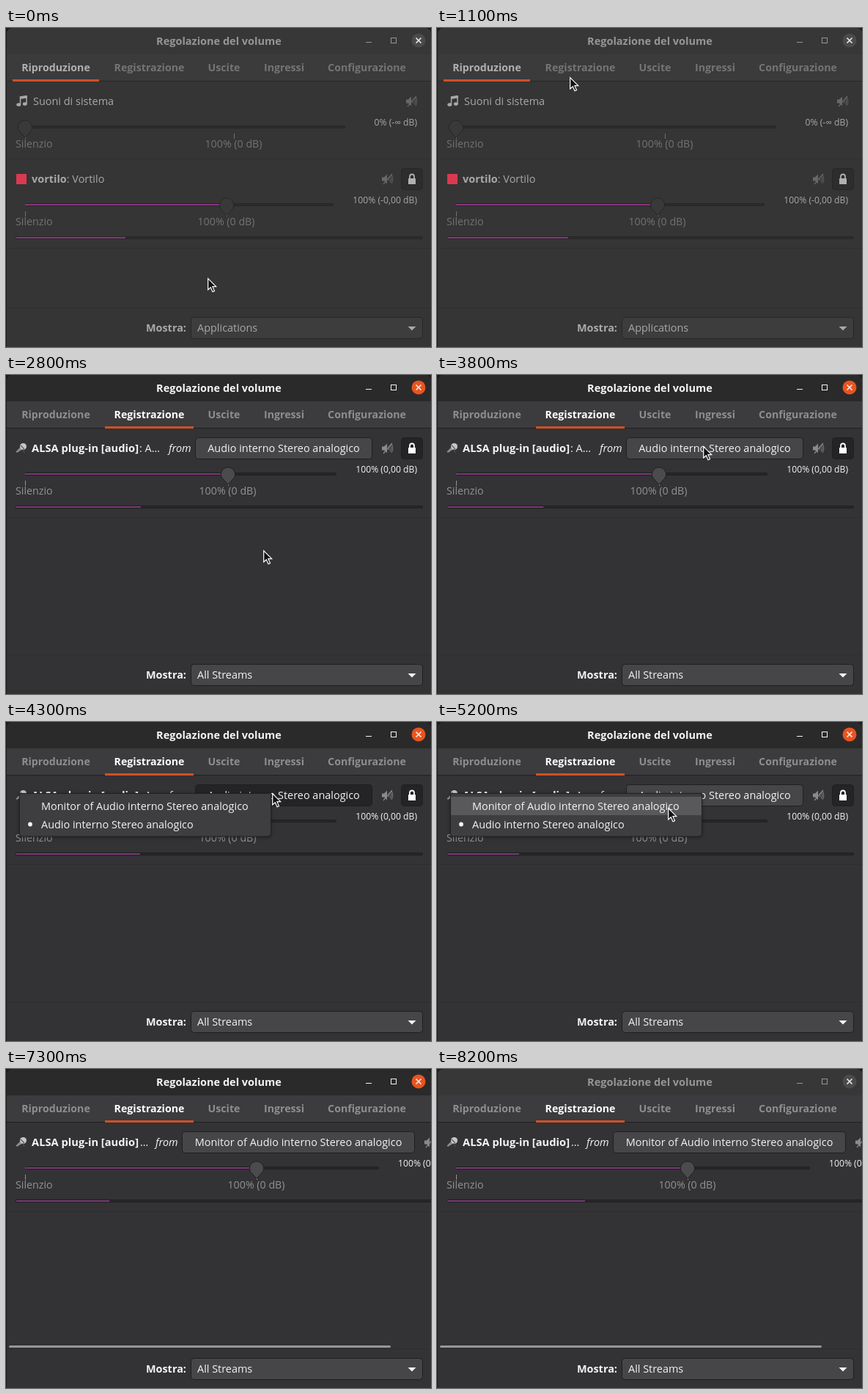
Animation of 580x435 px, one loop 8.3 s. Source, as an HTML page:

```html
<!DOCTYPE html>
<html lang="it">
<head>
<meta charset="utf-8">
<title>Regolazione del volume</title>
<style>
  html, body { margin: 0; width: 100%; height: 100%; overflow: hidden; background: #333234; }
  svg {
    display: block; font: 14.45px "Open Sans", "Noto Sans", sans-serif;
    --title: #2b2a2b; --titleText: #f5f5f5; --close: #e95420; --bg: #333234; --bar: #3c3b3d;
    --tab: #8e8d8f; --on: #fff; --text: #f4f4f4; --label: #929193;
    --knob: #4b4a4c; --button: #464547; --down: #242325; --fill: #7a3a78; --icon: #8a898b;
    --trough: #272628; --edge: #1f1e20; --line: #2e2d2f;
  }
  svg.blur { --title: #383738; --titleText: #969596; --close: #4b4a4c; }
  svg.away {
    --bg: #353535; --bar: #3b3b3b; --tab: #747474; --on: #b0b0b0; --text: #a8a8a8;
    --label: #727272; --knob: #393939; --button: #3d3d3d; --down: #2d2d2d; --fill: #8a3380;
    --icon: #686868; --trough: #2b2b2b; --edge: #262626; --line: #2f2f2f;
  }
  text { fill: var(--text); white-space: pre; }
  .b { font-weight: 700; }
  .i { font-style: italic; }
  .tab { font-weight: 700; font-size: 14.2px; text-anchor: middle; fill: var(--tab); }
  .tab.on { fill: var(--on); }
  .label { fill: var(--label); font-size: 14.25px; }
  .small { font-size: 12.2px; }
  .mid { text-anchor: middle; }
  .end { text-anchor: end; }
  .box { fill: var(--button); stroke: var(--edge); }
  .box.down { fill: var(--down); }
</style>
</head>
<body>
<svg id="stage" width="580" height="435" viewBox="0 0 580 435"></svg>
<script>
const stage = document.getElementById('stage');

const rect = (x, y, w, h, fill, extra = '') =>
  `<rect x="${x}" y="${y}" width="${w}" height="${h}" fill="${fill}" ${extra}/>`;
const text = (x, y, s, cls = '') => `<text x="${x}" y="${y}" class="${cls}">${s}</text>`;
const box = (x, y, w, h, cls = '') =>
  `<rect x="${x + .5}" y="${y + .5}" width="${w - 1}" height="${h - 1}" rx="4" class="box ${cls}"/>`;
const at = (x, y, s) => `<g transform="translate(${x} ${y})">${s}</g>`;
const group = (id, s) => `<g id="${id}">${s}</g>`;
const line = y => rect(1, y, 579, 1, 'var(--line)');

const trough = (x, y, w) =>
  `<rect x="${x + .5}" y="${y + .5}" width="${w - 1}" height="3" rx="1.5" fill="var(--trough)" stroke="var(--edge)"/>`;

function slider(y, end, knob, mark, low) {
  const tick = x => rect(x, y + 9, 1, 7, 'var(--label)');
  return trough(26, y - 2, end - 26) + tick(26) + tick(mark) +
    (low ? '' : rect(26, y - 1, knob - 26, 2, 'var(--fill)')) +
    at(knob, y, `<path d="M0 14.500L-8.500 5A9.600 9.600 0 1 1 8.500 5Z" fill="var(--knob)" stroke="var(--edge)"/>`) +
    text(13, y + 28, 'Silenzio', 'label') +
    text(mark - .5, y + 28, '100% (0 dB)', 'label mid');
}

const meter = (id, y, w) =>
  trough(13, y - 2, w) + `<rect id="${id}" x="14" y="${y - 1}" height="2" fill="var(--fill)"/>`;

const speaker = (x, y) => at(x, y,
  `<path d="M-8-2.500h3l4-4v13l-4-4h-3Z" fill="var(--icon)"/>
   <path d="M1-2.500q2 2.500 0 5M3-4.500q3.500 4.500 0 9M5-6q3.500 6 0 12" fill="none" stroke="var(--icon)" stroke-width="1.200" opacity=".75"/>
   <path d="M-6 7L6-7" stroke="var(--icon)" stroke-width="1.200"/>`);

const lock = (x, y) => box(x, y, 30, 30, 'down') + at(x + 15, y + 15,
  `<rect x="-5" y="-1" width="10" height="8" rx=".5" fill="var(--on)"/>
   <path d="M-3-1v-2.500a3 3 0 0 1 6 0V-1" fill="none" stroke="var(--on)" stroke-width="1.800"/>`);

const note = at(14, 92,
  `<path d="M5.500 12V2L14 .8V11" fill="none" stroke="var(--text)" stroke-width="1.500"/>
   <path d="M5 1.500L14.700 0v3.500L5 5Z" fill="var(--text)"/>
   <ellipse cx="3.300" cy="12.500" rx="3" ry="2.300" fill="var(--text)"/>
   <ellipse cx="11.800" cy="11.500" rx="3" ry="2.300" fill="var(--text)"/>`);

const mic = at(13, 92,
  `<path d="M7 6L.5 12.500l1.500 1.500L10 9Z" fill="#8d8c8e"/>
   <circle cx="10.500" cy="5.500" r="4.500" fill="#c6c5c7"/>
   <path d="M7 4l5 5" stroke="#59585a" stroke-width="1.300"/>
   <path d="M10 9l2 5" stroke="#59585a"/>`);

const windowButtons =
  rect(491, 19, 8, 1, 'var(--titleText)') +
  rect(525.5, 13.5, 7, 7, 'none', 'stroke="var(--titleText)"') +
  `<circle cx="563" cy="17" r="9.500" fill="var(--close)"/>
   <path d="M559.500 13.500l7 7m0-7l-7 7" stroke="#f4f4f4" stroke-width="1.500"/>`;

const tabs = [['Riproduzione', 68], ['Registrazione', 195.5], ['Uscite', 297.5], ['Ingressi', 379.5], ['Configurazione', 492.5]]
  .map(([s, x]) => text(x, 59, s, 'tab')).join('');

const playback =
  note + text(37, 105, 'Suoni di sistema') + speaker(554, 100) +
  text(561, 133, '0% (-∞ dB)', 'small end') + slider(135, 463, 26, 311, true) + line(178) +
  rect(14, 199, 14, 14, '#d93a50') +
  text(35, 211, '<tspan class="b">vortilo</tspan>: Vortilo') +
  speaker(521, 206) + lock(539, 191) + text(561, 239, '100% (-0,00 dB)', 'small end') +
  slider(241, 447, 301, 301) + meter('outLevel', 286, 556) + line(300);

const recordHead = mic + '<text x="35" y="105" class="b" style="font-size:14.7px">ALSA plug-in [audio]</text>';

const narrow =
  text(182, 105, ': A…') + text(222, 105, 'from', 'i') +
  '<g id="source">' + box(258, 85, 242, 30) + '</g>' +
  text(379, 105, 'Audio interno Stereo analogico', 'mid') + speaker(521, 100) + lock(539, 85) +
  text(561, 133, '100% (0,00 dB)', 'small end') + slider(135, 451, 303, 303);

const wide =
  text(183, 105, '…') + text(204, 105, 'from', 'i') + box(240, 85, 318, 30) +
  text(399, 105, 'Monitor of Audio interno Stereo analogico', 'mid') + speaker(579, 100) +
  text(535, 133, '100% (0,00 dB)', 'small') + slider(135, 509, 342, 342);

const popup =
  `<path d="M18.500 97.500h343V152q0 4-4 4H22.500q-4 0-4-4Z" fill="#3e3d3f" stroke="#222123"
    style="filter:drop-shadow(0 1px 2px #0006)"/>` +
  rect(19, 102, 342, 25, '#59585a', 'id="hover"') +
  text(48, 120, 'Monitor of Audio interno Stereo analogico') +
  text(48, 145, 'Audio interno Stereo analogico') +
  '<circle cx="33" cy="139.500" r="2.900" fill="#f4f4f4"/>';

stage.innerHTML =
  rect(0, 0, 580, 435, 'var(--bg)') +
  rect(0, 0, 580, 36, '#19181a') +
  '<path d="M1 36V8Q1 0 9 0H572Q580 0 580 8V36Z" fill="var(--title)"/>' +
  text(290.5, 23, '<tspan style="font-size:14.5px;fill:var(--titleText)">Regolazione del volume</tspan>', 'b mid') +
  windowButtons +
  rect(0, 36, 580, 37, 'var(--bar)') + rect(0, 72, 580, 1, 'var(--edge)') + tabs +
  rect(9, 70, 118, 3, '#cf5026', 'id="underline"') +
  group('playback', playback) +
  group('record', recordHead + group('narrow', narrow) + group('wide', wide) +
    meter('inLevel', 180, 556) + line(194)) +
  rect(4, 377, 521, 3, '#969597', 'id="scroll" rx="1.5"') +
  line(381) + text(246, 414, 'Mostra:', 'b end') + box(252, 394, 317, 30) +
  '<text id="filter" x="261" y="414"></text><path d="M548.500 407h11l-5.500 5.500Z" fill="var(--text)"/>' +
  rect(0, 0, 1, 435, '#1c1b1d') +
  group('popup', popup) +
  '<path id="cursor" d="M.7.7V16L4.300 12.700 7 18.700 9.500 17.600 6.900 11.700H11.700Z" fill="#111" stroke="#fff" stroke-width="1.200"/>';

const el = {};
stage.querySelectorAll('[id]').forEach(n => el[n.id] = n);
const tabText = stage.querySelectorAll('.tab');
const show = (n, on) => n.style.display = on ? '' : 'none';

const LOOP = 8300, STEP = 100;
const OPEN_TAB = 1200, PRESS = 3900, RELEASE = 4400, HOVER = 4800, CHOOSE = 5900, FADE = 6400, LEAVE = 7300, BLUR = 8200;

// time, x, y
const path = [
  [0, 275, 341], [200, 275, 341], [900, 186, 70], [1100, 181, 67], [1900, 181, 67],
  [2400, 338, 251], [2700, 351, 239], [2900, 351, 239], [3300, 469, 96], [3600, 363, 97],
  [4500, 363, 97], [5000, 315, 117], [6100, 315, 117], [6400, 314, 117], [6600, 314, 117], [7200, 200, 20]
];
// time, right end of the level bar
const outKeys = [[0, 163], [400, 144], [800, 205], [1200, 170]];
const inKeys = [
  [1200, 105], [1500, 145], [1800, 172], [2100, 81], [2400, 150], [2600, 96], [2800, 184],
  [3100, 85], [3400, 160], [3700, 118], [4000, 200], [4300, 183], [4700, 150], [5200, 112],
  [5600, 92], [6000, 210], [6400, 191], [6800, 100], [7200, 170], [7500, 84], [7900, 215], [8200, 202]
];

function sample(keys, t, ease = k => k) {
  let i = 0;
  while (i < keys.length - 2 && t >= keys[i + 1][0]) i++;
  const a = keys[i], b = keys[i + 1];
  const k = ease(Math.min(1, Math.max(0, (t - a[0]) / (b[0] - a[0]))));
  return a.slice(1).map((v, j) => v + (b[j + 1] - v) * k);
}
const smooth = k => k * k * (3 - 2 * k);

function draw(t) {
  const rec = t >= OPEN_TAB, chosen = t >= CHOOSE;
  stage.setAttribute('class', !rec ? 'away blur' : t >= BLUR ? 'blur' : '');
  tabText.forEach((n, i) => n.classList.toggle('on', i === (rec ? 1 : 0)));
  el.underline.setAttribute('x', rec ? 135 : 9);
  el.underline.setAttribute('width', rec ? 121 : 118);
  el.filter.textContent = rec ? 'All Streams' : 'Applications';
  show(el.playback, !rec);
  show(el.record, rec);
  show(el.narrow, !chosen);
  show(el.wide, chosen);
  el.source.firstChild.classList.toggle('down', t >= PRESS && t < RELEASE);
  el.inLevel.previousSibling.setAttribute('width', chosen ? 595 : 555);
  show(el.popup, t >= PRESS && !chosen);
  show(el.hover, t >= HOVER);
  el.scroll.style.opacity = Math.min(1, Math.max(0, (t - FADE) / 300 + .06)) * (t >= FADE);
  el.outLevel.setAttribute('width', sample(outKeys, t)[0] - 14);
  el.inLevel.setAttribute('width', sample(inKeys, t)[0] - 14);
  const [x, y] = sample(path, t, smooth).map(Math.round);
  el.cursor.setAttribute('transform', `translate(${x} ${y})`);
  show(el.cursor, t < LEAVE);
}

let start;
function tick(now) {
  start ??= now;
  draw(Math.floor(((now - start) % LOOP) / STEP) * STEP);
  requestAnimationFrame(tick);
}
draw(0);
requestAnimationFrame(tick);
</script>
</body>
</html>
```
